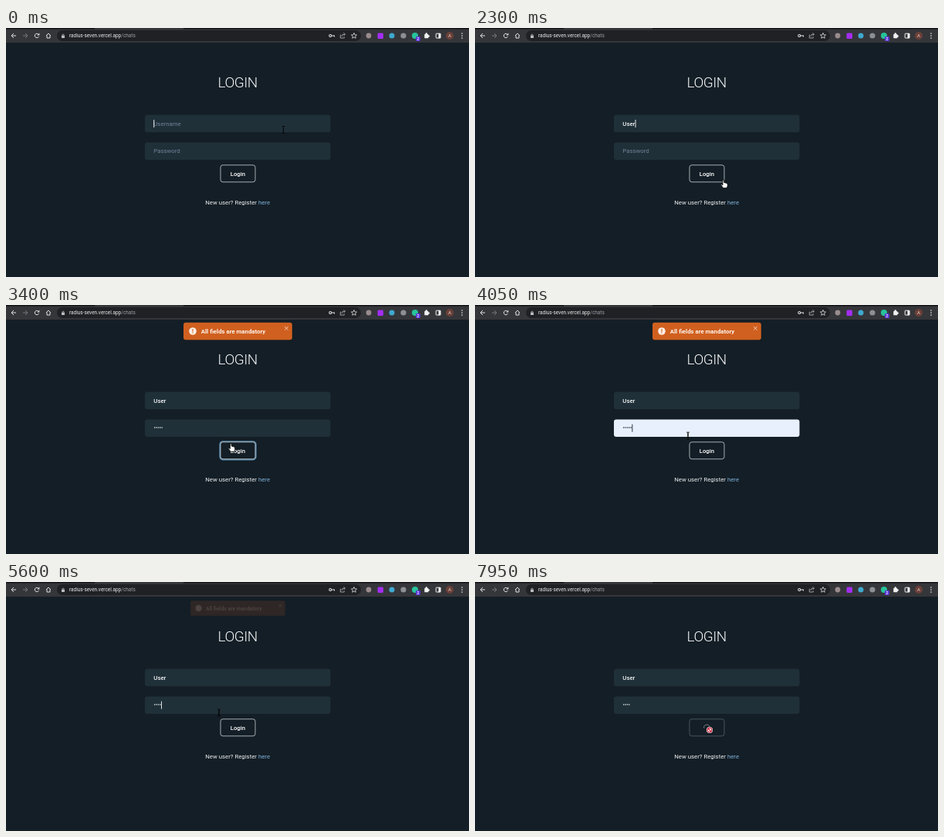
Recreate the animation shown at these times as an HTML page with a canvas. Size 600 px wide and 323 px high, loop 8000 ms.

```html
<!DOCTYPE html>
<html lang="en">
<head>
<meta charset="utf-8">
<title>Login</title>
<style>
html, body { margin: 0; width: 100%; height: 100%; overflow: hidden; background: #141e26; }
canvas { display: block; width: 600px; height: 323px; }
</style>
</head>
<body>
<canvas id="stage"></canvas>
<script>
const W = 600, H = 323, LOOP = 8000;
const canvas = document.getElementById('stage');
const ctx = canvas.getContext('2d');
const dpr = window.devicePixelRatio || 1;
canvas.width = W * dpr;
canvas.height = H * dpr;

const PAGE = '#141e26', FIELD = '#203038', ICON = '#dfe1e4';
const NAME = 'User';
const nameKeys = [700, 850, 1050, 1250];
const delKeys = [4280, 4400, 4520, 4640, 4770];
const passKeys = [5000, 5150, 5300, 5450];
const CLICK = 2500, FOCUS = 3750, SUBMIT = 6500;
const TOAST_OUT = 5420;

// Pointer path: time, x, y
const path = [
  [0, 359.5, 132], [1450, 359.5, 132], [2250, 322, 197], [2340, 322, 197],
  [2480, 314, 194.5], [3080, 314, 194.5], [3650, 276, 169.5],
  [5750, 276, 169.5], [6350, 304, 192], [LOOP, 304, 192]
];

const clamp = v => Math.max(0, Math.min(1, v));
const smooth = v => v * v * (3 - 2 * v);
const count = (keys, t) => keys.filter(k => k <= t).length;

function box(x, y, w, h, r, fill, stroke, lw = 1) {
  ctx.beginPath();
  ctx.roundRect(x, y, w, h, r);
  if (fill) { ctx.fillStyle = fill; ctx.fill(); }
  if (stroke) { ctx.strokeStyle = stroke; ctx.lineWidth = lw; ctx.stroke(); }
}

function disc(x, y, r, fill) {
  ctx.beginPath();
  ctx.arc(x, y, r, 0, Math.PI * 2);
  ctx.fillStyle = fill;
  ctx.fill();
}

function ring(x, y, r, color, lw = 1, a = 0, b = Math.PI * 2) {
  ctx.beginPath();
  ctx.arc(x, y, r, a, b);
  ctx.strokeStyle = color;
  ctx.lineWidth = lw;
  ctx.stroke();
}

function poly(points, stroke, lw = 1, fill) {
  ctx.beginPath();
  points.forEach(([x, y], i) => i ? ctx.lineTo(x, y) : ctx.moveTo(x, y));
  if (fill) { ctx.closePath(); ctx.fillStyle = fill; ctx.fill(); }
  if (stroke) { ctx.strokeStyle = stroke; ctx.lineWidth = lw; ctx.stroke(); }
}

function text(s, x, y, size, color, weight = 400, align = 'left') {
  ctx.font = `${weight} ${size}px Roboto, sans-serif`;
  ctx.textAlign = align;
  ctx.fillStyle = color;
  ctx.fillText(s, x, y);
  return ctx.measureText(s).width;
}

function arrowIcon(x, dir, color) {
  poly([[x - 3, 10], [x + 3, 10]], color);
  poly([[x, 7], [x + 3 * dir, 10], [x, 13]], color);
}

function star(x, y, r) {
  const pts = [];
  for (let i = 0; i <= 10; i++) {
    const a = -Math.PI / 2 + i * Math.PI / 5, d = i % 2 ? r * 0.45 : r;
    pts.push([x + d * Math.cos(a), y + d * Math.sin(a)]);
  }
  poly(pts, ICON, 0.8);
}

function browser() {
  ctx.fillStyle = '#35363a';
  ctx.fillRect(0, 0, W, 19);
  ctx.fillStyle = '#101113';
  ctx.fillRect(0, 0, 115, 1.4);
  ctx.fillRect(230, 0, W - 230, 1.4);

  arrowIcon(10, -1, ICON);
  arrowIcon(25, 1, '#777a7e');
  ring(40, 10, 2.7, ICON, 1, 0.4, 5.4);
  poly([[43.3, 6.6], [43.3, 9.6], [40.3, 9.6]], null, 1, ICON);
  poly([[52, 10], [55, 7], [58, 10]], ICON);
  poly([[53, 9.5], [53, 13], [57, 13], [57, 9.5]], ICON);

  box(66, 3, 394, 14, 7, '#202124');
  box(72, 9.5, 4, 3.4, 0.5, '#b8bbbf');
  ring(74, 9.4, 1.3, '#b8bbbf', 0.7, Math.PI, 0);
  const w = text('radius-seven.vercel.app', 82, 12.3, 6.45, '#e8eaed');
  text('/chats', 82 + w, 12.3, 6.45, '#9aa0a6');

  ring(420.3, 10, 1.5, ICON, 1.1);
  poly([[422, 10], [425.5, 10], [425.5, 11.5]], ICON, 1.1);
  poly([[434, 9], [433.3, 9], [433.3, 13], [438.3, 13], [438.3, 11.5]], '#b8bbbf', 0.8);
  poly([[435, 11], [436, 8.5], [439.3, 8.2]], '#b8bbbf', 0.8);
  poly([[437.5, 6.4], [439.5, 8.2], [437.5, 10]], '#b8bbbf', 0.8);
  star(451, 10.2, 3.8);

  disc(470, 10, 3.4, '#9a8b8d');
  box(481.5, 6.5, 7.5, 7.5, 1.5, '#a32df0');
  disc(500, 10, 3.5, '#3fa9d0');
  disc(515, 10, 3.6, '#8c9094');
  disc(530, 10, 4, '#27c29a');
  box(531, 11, 6, 6, 1.2, '#5a35d6');
  text('2', 534, 16, 5, '#fff', 500, 'center');
  box(542.3, 8, 5, 5.3, 0.6, '#f1f1f1');
  disc(544.8, 7.6, 1.3, '#f1f1f1');
  disc(547.6, 10.6, 1.3, '#f1f1f1');
  box(557.2, 7.2, 5.8, 5.8, 0.6, null, '#f1f1f1', 1);
  ctx.fillStyle = '#f1f1f1';
  ctx.fillRect(560.5, 7, 2.7, 6.2);
  disc(575, 10, 5, '#6b4038');
  text('A', 575, 12.2, 6, '#ecdcd7', 400, 'center');
  [7, 10, 13].forEach(y => disc(591, y, 0.85, ICON));
}

function caretOn(t, last) {
  return (t - last) % 1000 < 500;
}

function caret(x, y, color) {
  ctx.fillStyle = color;
  ctx.fillRect(x, y - 5, 0.9, 10);
}

function nameField(t) {
  box(180, 112.8, 240.5, 22.4, 3, FIELD);
  const n = count(nameKeys, t);
  const typed = NAME.slice(0, n);
  const w = text(typed, 191.3, 126.8, 7.8, '#f2f5f6', 500);
  if (!n) text('Username', 191.3, 126.8, 7.8, '#71829a');
  const last = n ? nameKeys[n - 1] : 0;
  if (t < CLICK && caretOn(t, last)) caret(191.3 + (n ? w + 0.2 : 0), 124, '#fff');
}

function passField(t) {
  const light = t >= FOCUS && t < delKeys[0];
  const ink = light ? '#15202a' : '#f2f5f6';
  box(180, 148.5, 240.5, 22.4, 3, light ? '#e8f0fe' : FIELD);
  const n = t < CLICK ? 0 : 5 - count(delKeys, t) + count(passKeys, t);
  if (!n) text('Password', 191.3, 162.4, 7.8, '#71829a');
  for (let i = 0; i < n; i++) disc(192.7 + i * 2.35, 159, 0.8, ink);
  if (t >= FOCUS && t < SUBMIT) {
    const last = [FOCUS, ...delKeys, ...passKeys].filter(k => k <= t).pop();
    if (caretOn(t, last)) caret(191.4 + n * 2.4, 159.7, ink);
  }
}

function button(t) {
  const busy = t >= SUBMIT + 120;
  const focus = t < 5000
    ? clamp((t - CLICK) / 200) * (1 - clamp((t - FOCUS) / 200))
    : clamp((t - SUBMIT) / 80) * (busy ? 1 - clamp((t - SUBMIT - 120) / 200) : 1);
  if (focus > 0) {
    ctx.globalAlpha = focus;
    box(277.2, 177, 46.6, 23.6, 3.8, null, '#5689ad', 1.7);
    ctx.globalAlpha = 1;
  }
  box(278, 177.8, 45, 22, 3, null, busy ? '#56606a' : '#c9d0d4', 0.8);
  if (!busy) {
    text('Login', 300.4, 191.5, 7.8, '#fff', 500, 'center');
    return;
  }
  const mid = (-100 + 360 * (t - 7950) / 450) * Math.PI / 180;
  ring(300.4, 188.9, 3.7, '#7d858b', 1, mid - Math.PI / 2, mid + Math.PI / 2);
}

function toast(t) {
  if (t < CLICK || t > TOAST_OUT + 200) return;
  const enter = smooth(clamp((t - CLICK) / 400));
  const leave = clamp((t - TOAST_OUT) / 200) ** 1.5;
  const scale = 1 - 0.15 * leave;
  ctx.save();
  ctx.globalAlpha = enter * (1 - leave);
  ctx.translate(300.4, 34 - 11 * (1 - enter));
  ctx.scale(scale, scale);
  ctx.translate(-300.4, -34);
  box(230, 22.7, 140.8, 22.6, 3, '#d0601f');
  disc(242, 34, 4.8, '#fbeee6');
  ctx.fillStyle = '#d0601f';
  ctx.fillRect(241.4, 31.2, 1.2, 3.4);
  ctx.fillRect(241.4, 35.5, 1.2, 1.2);
  text('All fields are mandatory', 252.8, 37.2, 7.8, '#fff4ec', 700);
  poly([[361.2, 28], [365.6, 32.4]], '#f5d9c9', 0.9);
  poly([[365.6, 28], [361.2, 32.4]], '#f5d9c9', 0.9);
  ctx.restore();
}

function pointerAt(t) {
  const i = path.findIndex(p => p[0] > t);
  const [t0, x0, y0] = path[i - 1], [t1, x1, y1] = path[i];
  const k = smooth((t - t0) / (t1 - t0));
  return [x0 + (x1 - x0) * k, y0 + (y1 - y0) * k];
}

function beam() {
  poly([[-2, -4.5], [-0.5, -4.5], [0, -4], [0, 4], [-0.5, 4.5], [-2, 4.5]], '#030506', 0.9);
  poly([[2, -4.5], [0.5, -4.5], [0, -4], [0, 4], [0.5, 4.5], [2, 4.5]], '#030506', 0.9);
}

function hand() {
  poly([[-1, 0], [0.6, 0], [0.8, 3.4], [5, 4.6], [5.4, 7.5], [4.3, 10.6],
    [-0.4, 10.6], [-3.2, 6.6], [-2.6, 5.6], [-1, 7], [-1, 0]], '#05080a', 0.8, '#fff');
}

function arrow() {
  poly([[0, 0], [0, 9], [2.1, 7.1], [3.5, 10.2], [4.9, 9.6], [3.5, 6.6], [6.3, 6.4], [0, 0]],
    '#05080a', 0.7, '#fff');
}

function denied() {
  disc(0, 0, 4, '#fff');
  ring(0, 0, 2.9, '#c51f35', 1.2);
  poly([[-2, -2], [2, 2]], '#c51f35', 1.3);
}

function pointer(t) {
  const [x, y] = pointerAt(t);
  const inField = x > 180 && x < 420 && ((y > 113 && y < 135) || (y > 148 && y < 171));
  const inButton = x > 278 && x < 323 && y > 177 && y < 200;
  const draw = inField ? beam : !inButton ? arrow : t >= SUBMIT + 120 ? denied : hand;
  ctx.save();
  ctx.translate(x, y);
  draw();
  ctx.restore();
}

function render(t) {
  ctx.setTransform(dpr, 0, 0, dpr, 0, 0);
  ctx.fillStyle = PAGE;
  ctx.fillRect(0, 0, W, H);
  ctx.letterSpacing = '-0.5px';
  text('LOGIN', 300.2, 77, 19, '#f4f7f8', 300, 'center');
  ctx.letterSpacing = '0px';
  nameField(t);
  passField(t);
  button(t);
  const w = text('New user? Register ', 258.2, 229.4, 7.8, '#eef1f2');
  text('here', 258.2 + w, 229.4, 7.8, '#7fb2dc');
  toast(t);
  browser();
  pointer(t);
}

const start = performance.now();
function tick() {
  render((performance.now() - start) % LOOP);
  requestAnimationFrame(tick);
}
tick();
</script>
</body>
</html>
```
